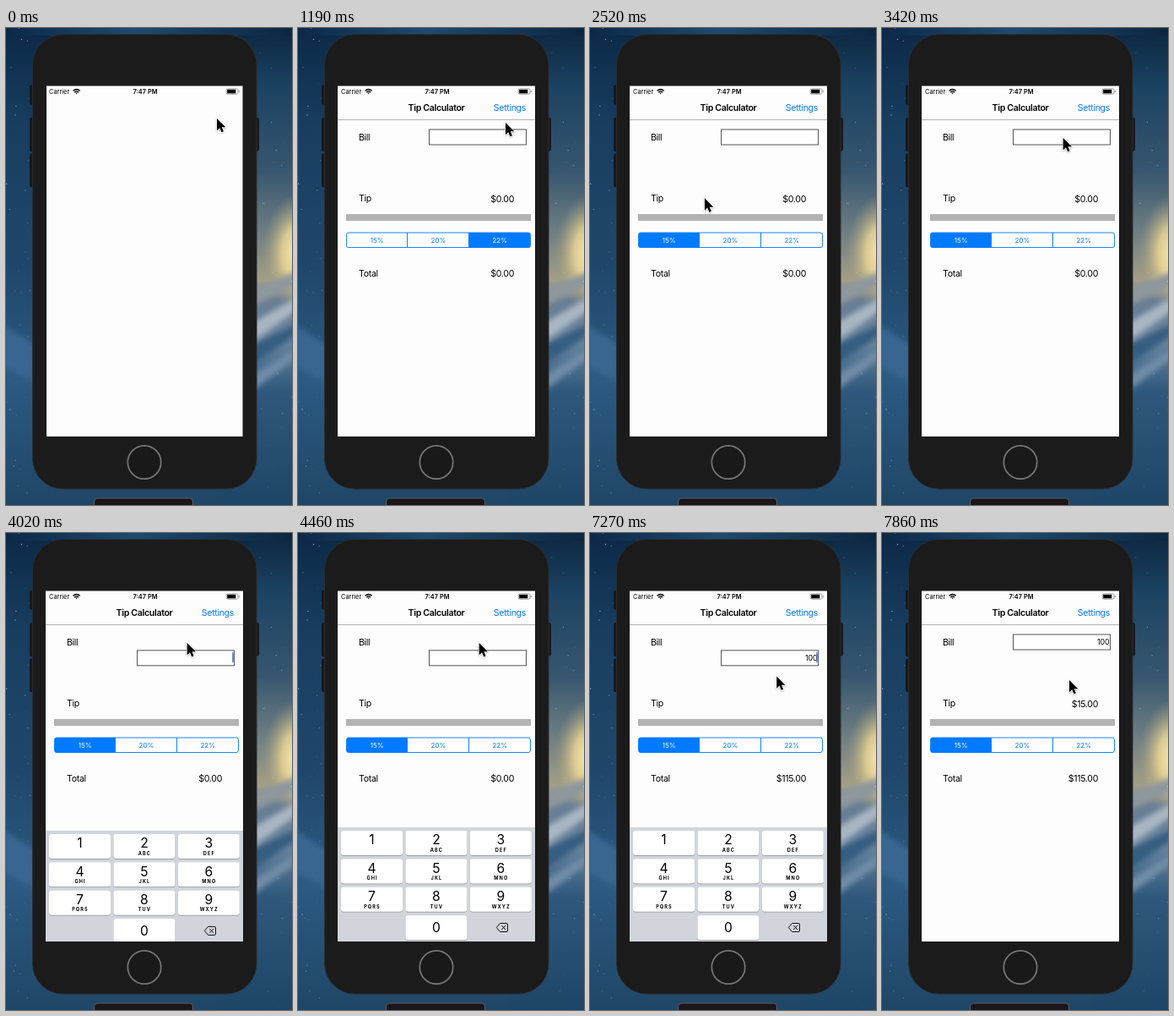
Animation, 339 px wide and 564 px high, one loop 8 s. Source, as an HTML page:

```html
<!DOCTYPE html>
<html lang="en">
<head>
<meta charset="utf-8">
<title>Tip Calculator</title>
<style>
html, body { margin: 0; width: 100%; height: 100%; overflow: hidden; background: #1d4163; }
svg { display: block; width: 339px; height: 564px; font-family: Inter, Roboto, sans-serif; }
.body { font-size: 10.6px; letter-spacing: -.33px; }
.status { font-size: 7.4px; }
.seg { font-size: 8px; text-anchor: middle; }
.digit { font-size: 15.6px; text-anchor: middle; }
.letters { font-size: 5.6px; font-weight: 700; letter-spacing: 1.1px; text-anchor: middle; }
.end { text-anchor: end; }
.mid { text-anchor: middle; }
.bold { font-weight: 600; }
</style>
</head>
<body>
<svg viewBox="0 0 339 564">
  <defs>
    <linearGradient id="left" x2="0" y2="1">
      <stop offset="0" stop-color="#0c2947"/>
      <stop offset=".2" stop-color="#183d5f"/>
      <stop offset=".5" stop-color="#20476b"/>
      <stop offset=".74" stop-color="#2c5a82"/>
      <stop offset="1" stop-color="#1f4666"/>
    </linearGradient>
    <linearGradient id="right" x2="0" y2="1">
      <stop offset="0" stop-color="#0c2640"/>
      <stop offset=".12" stop-color="#1b4261"/>
      <stop offset=".3" stop-color="#37566f"/>
      <stop offset=".43" stop-color="#6f7f83"/>
      <stop offset=".53" stop-color="#a59f86"/>
      <stop offset=".57" stop-color="#687d92"/>
      <stop offset=".66" stop-color="#66839f"/>
      <stop offset=".76" stop-color="#2f587c"/>
      <stop offset="1" stop-color="#1d4567"/>
    </linearGradient>
    <radialGradient id="glow">
      <stop offset="0" stop-color="#fff0bd"/>
      <stop offset=".45" stop-color="#ead593" stop-opacity=".85"/>
      <stop offset="1" stop-color="#a59c7c" stop-opacity="0"/>
    </radialGradient>
    <linearGradient id="top">
      <stop offset="0" stop-color="#0c2947"/>
      <stop offset=".45" stop-color="#1d4a70"/>
      <stop offset="1" stop-color="#0c2640"/>
    </linearGradient>
    <filter id="soft" x="-50%" y="-50%" width="200%" height="200%"><feGaussianBlur stdDeviation="3"/></filter>
    <filter id="shade" x="-50%" y="-50%" width="200%" height="200%">
      <feDropShadow dx="0" dy=".8" stdDeviation=".8" flood-opacity=".35"/>
    </filter>
    <clipPath id="screenClip"><rect x="47" y="68.5" width="234" height="414.5"/></clipPath>
  </defs>

  <rect width="339" height="564" fill="url(#left)"/>
  <rect x="250" width="89" height="564" fill="url(#right)"/>
  <rect width="339" height="9" fill="url(#top)"/>
  <ellipse cx="346" cy="266" rx="42" ry="70" fill="url(#glow)"/>
  <g filter="url(#soft)">
    <path d="M290 308L345 288V304L290 330Z" fill="#8d979c"/>
    <path d="M290 350L345 318V334L290 372Z" fill="#a9b6c3"/>
    <path d="M290 375L345 350V362L290 400Z" fill="#365d80"/>
    <path d="M290 412L345 378V390L290 430Z" fill="#6f8ca8"/>
    <path d="M-5 350L34 375V420L-5 400Z" fill="#376690"/>
  </g>
  <g id="stars" fill="#c3d6e6"></g>

  <g fill="#1a1a1b" stroke="#0d0f12" stroke-width=".8">
    <rect x="28.5" y="68" width="6" height="22" rx="1.5"/>
    <rect x="28.5" y="106.500" width="6" height="39" rx="1.5"/>
    <rect x="28.5" y="149" width="6" height="38.500" rx="1.5"/>
    <rect x="293.500" y="106.500" width="6" height="38.500" rx="1.5"/>
  </g>
  <rect x="31.5" y="7.500" width="265.500" height="537.500" rx="36" fill="#1b1b1c" stroke="#2a2c2f"/>
  <circle cx="164" cy="513.500" r="19.700" fill="#19191a" stroke="#77787a" stroke-width="1.700"/>
  <rect x="104.500" y="556" width="117" height="14" rx="4" fill="#1c161b" stroke="#55606a"/>

  <rect id="screen" y="68.5" height="414.500" fill="#fdfdfd"/>
  <g class="status">
    <text x="51" y="77.700">Carrier</text>
    <text class="mid bold" x="165" y="77.700">7:47 PM</text>
  </g>
  <g fill="none" stroke="#000" stroke-width="1.300">
    <path d="M79.500 74.300Q83.600 70.700 87.700 74.300M81.100 76Q83.600 73.800 86.100 76"/>
    <path d="M82.300 76.500H84.900L83.600 78.200Z" fill="#000" stroke="none"/>
    <rect x="261.200" y="71.900" width="13.800" height="6.300" rx="1.500" stroke="#777" stroke-width=".7"/>
    <path d="M262.200 75.050H272.300" stroke-width="4.500"/>
    <path d="M276.300 74V76.200" stroke="#777" stroke-width=".8"/>
  </g>

  <path id="navLine" d="M47 108.500H281" stroke="#b5b5b7"/>
  <g id="app" class="body">
    <text class="mid bold" x="164" y="98.400">Tip Calculator</text>
    <text class="end" x="270" y="98.400" fill="#007aff">Settings</text>
    <text x="72" y="132.800">Bill</text>
    <text x="72" y="205.300">Tip</text>
    <text x="72" y="293.800">Total</text>
    <text id="tip" class="end" x="256" y="205.800"></text>
    <text id="total" class="end" x="256" y="293.800"></text>
    <rect x="57" y="220" width="219" height="8" fill="#b3b3b3"/>
    <g id="field">
      <rect x="155.500" y="120" width="115" height="18" fill="#fff" stroke="#555"/>
      <text id="bill" class="end" x="269.400" y="131.900" font-size="8.800" letter-spacing="-.1"></text>
      <rect id="caret" x="268.200" y="122.500" width="1.400" height="11.500" fill="#4560d0"/>
    </g>
    <g id="segments"></g>
  </g>
  <g clip-path="url(#screenClip)"><g id="keyboard"></g></g>

  <path id="pointer" d="M0 0V14.300L3.300 11.200L5.500 16.300L7.900 15.300L5.700 10.300H10.300Z"
    stroke="#fff" stroke-width="1.100" paint-order="stroke" filter="url(#shade)"/>
</svg>
<script>
const LOOP = 8000, TICK = 148.2, BLUE = '#007aff';
const $ = id => document.getElementById(id);

function drawStars() {
  let seed = 11;
  const rand = () => (seed = seed * 16807 % 2147483647) / 2147483647;
  let out = '';
  for (let i = 0; i < 70; i++) {
    const x = i % 2 ? rand() * 30 : 299 + rand() * 40;
    const y = rand() * 564;
    out += `<circle cx="${x}" cy="${y}" r="${.3 + rand() * .5}" opacity="${.2 + rand() * .6}"/>`;
  }
  $('stars').innerHTML = out;
}

function drawSegments() {
  const shapes = [
    'M129.500 242H60Q57.500 242 57.500 244.500V257Q57.500 259.500 60 259.500H129.500Z',
    'M129.500 242H202.500V259.500H129.500Z',
    'M202.500 242H273Q275.500 242 275.500 244.500V257Q275.500 259.500 273 259.500H202.500Z'
  ];
  $('segments').innerHTML = ['15%', '20%', '22%'].map((label, i) =>
    `<path d="${shapes[i]}" stroke="${BLUE}" stroke-width=".9"/>
     <text class="seg" x="${93.700 + i * 72.800}" y="253.800" letter-spacing="0">${label}</text>`).join('');
}

function drawKeyboard() {
  const letters = ['', 'ABC', 'DEF', 'GHI', 'JKL', 'MNO', 'PQRS', 'TUV', 'WXYZ'];
  const key = (col, row, digit, sub) => {
    const x = 51 + col * 76.400, y = 352 + row * 33.400, mid = x + 36.500;
    return `<rect x="${x}" y="${y + .8}" width="73" height="29" rx="3" fill="#8c9096"/>
      <rect x="${x}" y="${y}" width="73" height="29" rx="3" fill="#fff"/>
      <text class="digit" x="${mid}" y="${y + (digit ? 16.400 : 20)}">${digit}</text>
      <text class="letters" x="${mid + .5}" y="${y + 24.700}">${sub}</text>`;
  };
  $('keyboard').innerHTML = '<rect x="47" y="348" width="234" height="136" fill="#d1d5db"/>'
    + letters.map((sub, i) => key(i % 3, i / 3 | 0, i + 1, sub)).join('')
    + key(1, 3, 0, '')
    + `<path d="M235.300 466.500L239.500 461.500H247Q248.500 461.500 248.500 463V470Q248.500 471.500 247 471.500H239.500Z
        M241.300 464L246 469M246 464L241.300 469" fill="none" stroke="#111" stroke-width="1"/>`;
}

// Pointer stops: tick, x, y
const stops = [
  [0, 250, 107], [7, 250, 107], [8, 246, 112], [12, 82, 250], [13, 80.500, 251.500],
  [15, 80.500, 251.500], [20, 238, 109], [22, 213.500, 131], [23, 214.700, 130],
  [45, 214.700, 130], [50, 222, 174], [54, 222, 174]
];

function pointerAt(k) {
  const i = Math.max(1, stops.findIndex(s => s[0] >= k));
  const [k0, x0, y0] = stops[i - 1], [k1, x1, y1] = stops[i];
  const u = (k - k0) / (k1 - k0), e = u * u * (3 - 2 * u);
  return [x0 + (x1 - x0) * e, y0 + (y1 - y0) * e];
}

// Critically damped settle, from 1 to 0
const settle = n => n <= 0 ? 1 : (1 + 2.700 * n) * Math.exp(-2.700 * n);
const within = (k, ...spans) => spans.some(([a, b]) => k >= a && k < b);
const money = v => '$' + v.toFixed(2);

function render(k) {
  const loaded = k >= 1, editing = within(k, [26, 51]);
  $('screen').setAttribute('x', loaded ? 47 : 48);
  $('screen').setAttribute('width', loaded ? 234 : 232.500);
  $('navLine').style.opacity = +loaded;
  $('app').style.opacity = Math.min(1, Math.max(0, (k - 2) / 3));

  const bill = k >= 43 ? '100' : k >= 42 ? '10' : k >= 37 ? '1' : '';
  $('bill').textContent = bill;
  $('total').textContent = money((k === 37 ? 0 : +bill) * 1.15);
  $('tip').textContent = editing ? '' : money(bill * .15);
  $('field').setAttribute('transform', `translate(0 ${editing ? 18.800 : 0})`);
  $('caret').style.opacity = +within(k, [26, 30], [33, 36], [37, 38], [41, 44], [47, 50]);

  const chosen = k < 15 ? 2 : 0, pressed = within(k, [13, 15]);
  [...$('segments').children].forEach((el, i) => {
    const seg = i >> 1, on = seg === chosen;
    if (i % 2) el.setAttribute('fill', on ? '#fff' : BLUE);
    else el.setAttribute('fill', on ? BLUE : pressed && seg === 0 ? '#d8e9fc' : '#fdfdfd');
  });

  const drop = k < 26 ? 1 : k < 51 ? settle(k - 25) : k < 53 ? 1 - settle(k - 50) : 1;
  $('keyboard').style.display = within(k, [26, 53]) ? '' : 'none';
  $('keyboard').setAttribute('transform', `translate(0 ${k > 27 && k < 51 ? 0 : drop * 135})`);

  $('pointer').setAttribute('transform', `translate(${pointerAt(k)})`);
}

drawStars();
drawSegments();
drawKeyboard();
const start = performance.now();
let last = -1;
function loop() {
  const k = Math.floor((performance.now() - start) % LOOP / TICK);
  if (k !== last) render(last = k);
  requestAnimationFrame(loop);
}
loop();
</script>
</body>
</html>
```
